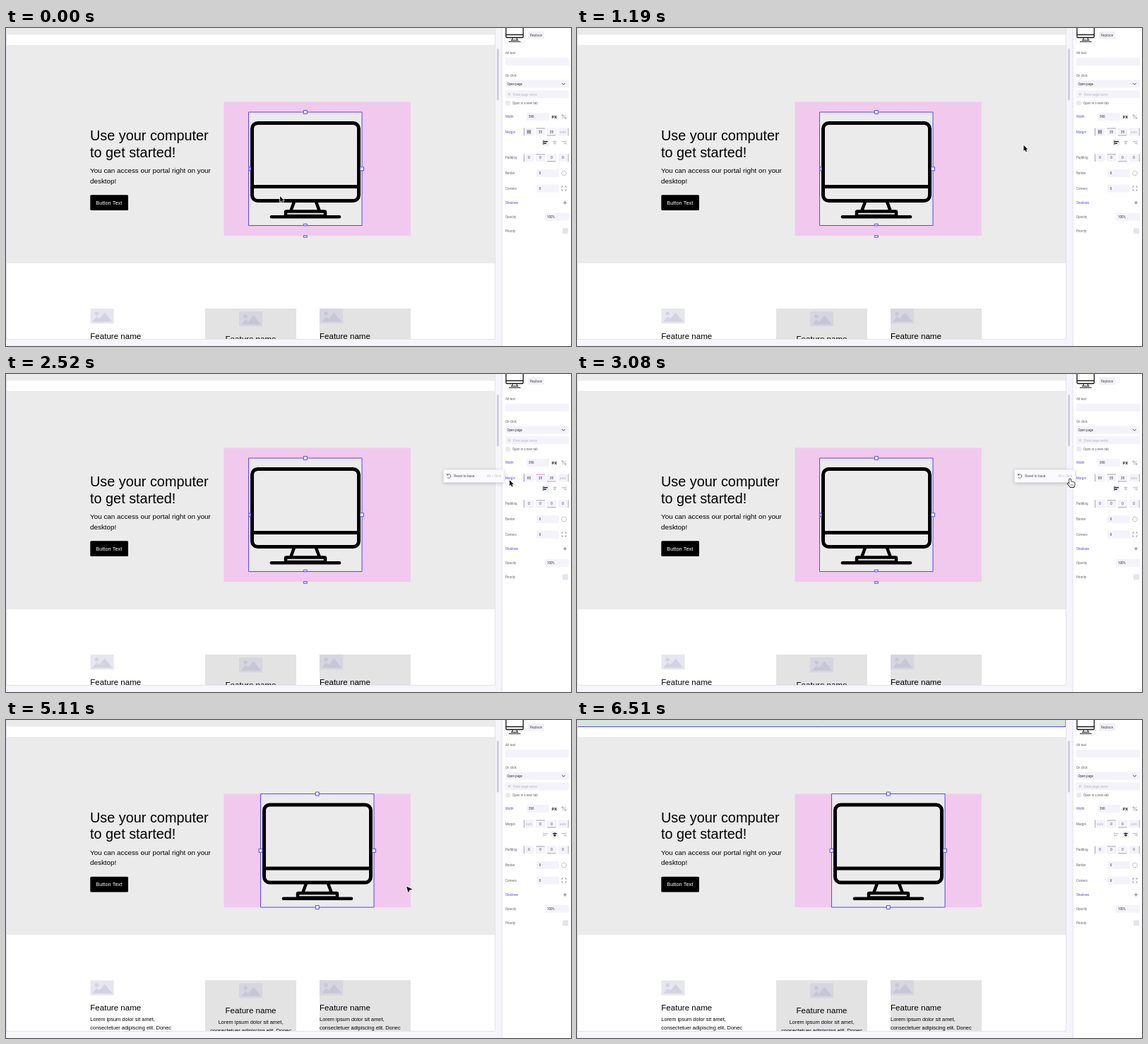
These frames come from a looping animation (800 px wide and 450 px high, 6580 ms). An HTML page with a canvas:

```html
<!DOCTYPE html>
<html lang="en">
<head>
<meta charset="utf-8">
<title>Reset margin to base</title>
<style>
  html, body { margin: 0; width: 100%; height: 100%; overflow: hidden; background: #fff; }
  canvas { display: block; width: 800px; height: 450px; }
</style>
</head>
<body>
<canvas id="stage"></canvas>
<script>
const LOOP = 6580, STEP = 70;
const RESET = 3780, MENU_OPEN = 2450, STRIP_HOVER = 6160;
const BLUE = '#5549ee', LABEL_BLUE = '#5a4fdc', LABEL = '#62626c', INK = '#303038';
const FIELD = '#f4f3fa', FAINT = '#b6b6c2', GREY = '#ebebeb', PINK = '#f2c9ee';
const SANS = '"Liberation Sans", Arial, sans-serif';
const UI = 'Roboto, Inter, sans-serif';

const canvas = document.getElementById('stage');
const ratio = window.devicePixelRatio || 1;
canvas.width = 800 * ratio;
canvas.height = 450 * ratio;
const c = canvas.getContext('2d');

const clamp = v => Math.max(0, Math.min(1, v));
const smooth = v => v * v * (3 - 2 * v);

function box(x, y, w, h, fill, r = 0) {
  c.fillStyle = fill;
  c.beginPath();
  c.roundRect(x, y, w, h, r);
  c.fill();
}

function frame(x, y, w, h, color, width = 1, r = 0) {
  c.strokeStyle = color;
  c.lineWidth = width;
  c.beginPath();
  c.roundRect(x, y, w, h, r);
  c.stroke();
}

function line(points, color, width, cap = 'butt') {
  c.strokeStyle = color;
  c.lineWidth = width;
  c.lineCap = cap;
  c.lineJoin = 'round';
  c.beginPath();
  points.forEach(([x, y]) => c.lineTo(x, y));
  c.stroke();
}

function shape(points, fill, outline, width = 1) {
  c.beginPath();
  points.forEach(([x, y]) => c.lineTo(x, y));
  c.closePath();
  c.lineJoin = 'round';
  if (outline) {
    c.strokeStyle = outline;
    c.lineWidth = width;
    c.stroke();
  }
  c.fillStyle = fill;
  c.fill();
}

function circle(x, y, r, fill, stroke, width = 1) {
  c.beginPath();
  c.arc(x, y, r, 0, Math.PI * 2);
  if (fill) { c.fillStyle = fill; c.fill(); }
  if (stroke) { c.strokeStyle = stroke; c.lineWidth = width; c.stroke(); }
}

function text(str, x, y, size, color = '#000', align = 'left', font = SANS, weight = 400) {
  c.font = `${weight} ${size}px ${font}`;
  c.textAlign = align;
  c.fillStyle = color;
  c.fillText(str, x, y);
}

// Panel text, placed by its vertical centre
function ui(str, x, mid, color = LABEL, align = 'left', size = 4.5, weight = 400) {
  text(str, x, mid + size * 0.36, size, color, align, UI, weight);
}

function handle(x, y, w = 5, h = 5) {
  box(x - w / 2, y - h / 2, w, h, '#f6f5ff');
  frame(x - w / 2, y - h / 2, w, h, BLUE, 1);
}

function computer(x, y) {
  c.save();
  c.translate(x, y);
  frame(5, 15.5, 151, 110, '#000', 5, 8);
  line([[5, 105.5], [156, 105.5]], '#000', 5);
  line([[64.5, 127], [60, 139]], '#000', 4.5);
  line([[95.5, 127], [100, 139]], '#000', 4.5);
  frame(52.5, 140.5, 56, 6.5, '#000', 4.5, 1);
  line([[32.5, 148.2], [128.5, 148.2]], '#000', 4.6, 'round');
  c.restore();
}

function placeholder(x, y, back, front) {
  c.save();
  c.beginPath();
  c.rect(x, y, 33.5, 21.5);
  c.clip();
  box(x, y, 33.5, 21.5, back);
  circle(x + 9, y + 7, 2.6, front);
  shape([[x + 3, y + 18.5], [x + 9, y + 11.5], [x + 13, y + 14.5], [x + 20.5, y + 5.5],
    [x + 31, y + 18.5]], front);
  c.restore();
}

function feature(x, y, card, centered) {
  if (card) box(x, y, 129, 100, '#e3e3e3');
  const top = centered ? y + 4 : y;
  const align = centered ? 'center' : 'left';
  const tx = centered ? x + 64.5 : x;
  placeholder(centered ? x + 48 : x, top, card ? '#d6d6df' : '#e6e6ef', card ? '#c6c6d6' : '#d2d2e0');
  text('Feature name', tx, top + 42.8, 11.56, '#000', align);
  text('Lorem ipsum dolor sit amet,', tx, top + 58, 7.43, '#000', align);
  text('consectetuer adipiscing elit. Donec', tx, top + 69.5, 7.43, '#000', align);
}

function page(reset, stripHover) {
  const up = reset ? -14.4 : 0;
  c.save();
  c.beginPath();
  c.rect(0, 0, 692.5, 440);
  c.clip();

  box(0, 0, 692.5, 9.5, stripHover ? '#d5e4dc' : GREY);
  if (stripHover) frame(0.5, -5, 691.5, 14.5, BLUE, 1);
  box(0, 24, 692.5, 309 + 2 * up, GREY);

  text('Use your computer', 119, 159 + up, 19.85);
  text('to get started!', 119, 182.8 + up, 19.85);
  text('You can access our portal right on your', 119, 205.2 + up, 9.9);
  text('desktop!', 119, 219.8 + up, 9.9);
  box(119.3, 236.2 + up, 53.7, 21.8, '#000', 1.5);
  text('Button Text', 127.2, 249.8 + up, 7.43, '#fff');

  box(308.5, 104.5, 264.5, reset ? 160.5 : 189.5, PINK);
  const x = reset ? 360.5 : 343.5, y = reset ? 104.5 : 119;
  box(x, y, 160.5, 160.5, GREY);
  computer(x, y);
  frame(x, y, 160.5, 160.5, BLUE, 1);
  handle(x + 80.3, y);
  handle(x + 160.5, y + 80.3);
  if (reset) {
    handle(x, y + 80.3);
    handle(x + 80.3, y + 160.5);
  } else {
    handle(x + 1.5, y + 80.3, 2.5, 5);
    handle(x + 80.3, y + 159.5, 5, 2.5);
    handle(x + 80.3, 295, 5, 2.5);
  }

  const fy = 397 + 2 * up;
  feature(119.3, fy, false, false);
  feature(282, fy, true, true);
  feature(444, fy, true, false);
  c.restore();

  line([[0.5, 0], [0.5, 440]], '#dfdfec', 1);
  box(692.5, 0, 9, 450, '#f6f5fb');
  box(0, 440, 701.5, 10, '#f5f5fb');
  line([[0, 440.5], [692.5, 440.5]], '#e2e2ec', 1);
  line([[692.5, 0], [692.5, 440]], '#e2e2ec', 1);
  box(695, 29, 3, 73.5, '#d0cfda', 1.5);
  line([[702, 0], [702, 450]], '#dcdce8', 1);
}

function quad(y, values, bars) {
  values.forEach((v, i) => {
    const x = 740.5 + 16 * i;
    box(x - 6.5, y - 5.5, 13.5, 11, FIELD, 1);
    ui(v, x, y, v === 'auto' ? FAINT : INK, 'center');
  });
  line([[733.5, y - 5.5], [733.5, y + 5.5]], bars[0], 1);
  line([[750.5, y - 5], [763, y - 5]], bars[1], 1);
  line([[766, y + 5], [778.5, y + 5]], bars[2], 1);
  line([[796.2, y - 5.5], [796.2, y + 5.5]], bars[3], 1);
}

function alignIcon(x, y, dir, active) {
  const color = active ? '#25252c' : '#c6c6d0';
  if (active) box(x - 5, y - 5, 10, 10, '#f0f0f6', 1);
  line([[x + 3 * dir, y - 3], [x + 3 * dir, y + 3]], color, 1);
  const row = (w, dy) => {
    const left = x - w / 2 - dir * (w / 2 - 2.5);
    const start = dir === 0 ? x - w / 2 : dir < 0 ? x - 2.5 : left - w / 2 + 2.5;
    line([[start, y + dy], [start + w, y + dy]], color, 1.4);
  };
  row(5.5, -1.3);
  row(3.5, 1.3);
}

function panel(reset, marginHover, selected) {
  c.save();
  c.translate(707.5, -11.5);
  c.scale(0.158, 0.2);
  frame(3, 0, 154, 125, '#111', 8, 8);
  line([[3, 105], [157, 105]], '#111', 7);
  c.restore();
  line([[717.5, 14], [716.5, 17]], '#111', 1);
  line([[723, 14], [724, 17]], '#111', 1);
  line([[715, 17.2], [725.5, 17.2]], '#111', 1);
  line([[712, 19.3], [728.5, 19.3]], '#111', 1);
  frame(706.5, -5, 28, 26.5, '#efeff5', 1, 1.5);
  box(739, 4.8, 23, 10.5, '#f0f0f6', 1.5);
  ui('Replace', 750.5, 10, '#50505a', 'center', 4.9);

  ui('Alt text', 707, 35);
  box(707, 42, 90, 11, FIELD, 1.5);
  ui('On click', 707, 67);
  box(707, 73.5, 90, 11, FIELD, 1.5);
  ui('Open page', 709.5, 79, INK);
  line([[787.3, 78], [789.5, 80.3], [791.7, 78]], '#333', 0.9);
  box(707, 88.3, 90, 11, FIELD, 1.5);
  circle(712.5, 93.8, 1.3, null, FAINT, 0.8);
  ui('Enter page name', 718, 94, FAINT);
  box(707.3, 103, 6.5, 6.5, '#e9e9f0', 1);
  ui('Open in a new tab', 717, 106.2);

  ui('Width', 707, 125.5, LABEL_BLUE);
  box(737, 120, 32, 11, FIELD, 1.5);
  ui('390', 740, 125.5, INK);
  ui('PX', 776.5, 125.7, '#222', 'center', 5.8, 700);
  line([[787.5, 128.3], [792.5, 122.7]], '#888892', 0.7);
  circle(788, 123.8, 1.1, null, '#888892', 0.7);
  circle(792, 127.4, 1.1, null, '#888892', 0.7);

  const bar = '#a8a8b5', hot = '#e08add';
  ui('Margin', 707, 147, reset ? LABEL : LABEL_BLUE);
  quad(147, reset ? ['auto', '0', '0', 'auto'] : ['85', '35', '35', 'auto'],
    marginHover ? ['#8e86e8', hot, hot, bar] : [bar, bar, bar, bar]);
  if (selected) {
    box(737.3, 143.5, 6.2, 7, marginHover ? '#a9cdf7' : '#cfcfd6');
    ui('85', 740.5, 147, INK, 'center');
  }
  alignIcon(764, 162, -1, !reset);
  alignIcon(777, 162, 0, reset);
  alignIcon(790, 162, 1, false);

  ui('Padding', 707, 183.5);
  quad(183.8, ['0', '0', '0', '0'], [bar, bar, bar, bar]);

  ui('Border', 707, 205.5);
  box(751, 200, 32, 11, FIELD, 1.5);
  ui('0', 756, 205.5, INK, 'center');
  c.setLineDash([2, 0.9]);
  circle(790, 205.5, 3.3, null, '#888892', 0.8);
  c.setLineDash([]);

  ui('Corners', 707, 227);
  box(751, 221.5, 32, 11, FIELD, 1.5);
  ui('0', 756, 227, INK, 'center');
  for (const sx of [-1, 1]) for (const sy of [-1, 1]) {
    line([[790 + sx * 3, 227 + sy], [790 + sx * 3, 227 + sy * 3], [790 + sx, 227 + sy * 3]], '#888892', 0.8);
  }

  ui('Shadows', 707, 247, LABEL_BLUE);
  line([[789, 247.2], [794, 247.2]], '#777781', 0.9);
  line([[791.5, 244.7], [791.5, 249.7]], '#777781', 0.9);

  ui('Opacity', 707, 267);
  box(763, 261.7, 34, 11, FIELD, 1.5);
  ui('100%', 766, 267.2, INK);
  ui('Priority', 707, 287);
  box(788, 283.2, 8, 8, '#e4e4ec', 1.5);
}

function menu(alpha) {
  if (alpha <= 0) return;
  c.save();
  c.globalAlpha = alpha;
  c.shadowColor = 'rgba(40, 40, 80, .28)';
  c.shadowBlur = 5 * ratio;
  c.shadowOffsetY = 1 * ratio;
  box(619.5, 135.5, 85.5, 18, '#fbfbfd', 1.5);
  c.shadowColor = 'transparent';
  c.beginPath();
  c.arc(627, 144.5, 2.8, -2.5, 2.6);
  c.strokeStyle = '#55555f';
  c.lineWidth = 0.8;
  c.stroke();
  line([[624.3, 140.8], [624.5, 143.2], [626.7, 143]], '#55555f', 0.8);
  ui('Reset to base', 634.3, 144.3, '#4c4c56', 'left', 4.8);
  ui('Alt + Click', 701, 144.3, '#bcbcc6', 'right', 4.5);
  c.restore();
}

function ripple(t) {
  if (t < 0 || t > 350) return;
  c.save();
  c.globalAlpha = 1 - clamp((t - 180) / 170);
  circle(668, 148.5, 9 + 6 * clamp(t / 140), 'rgba(255,255,255,.35)', '#5d92de', 1.8);
  c.restore();
}

// time, x, y of the pointer tip
const PATH = [
  [0, 388, 238], [630, 469, 198], [1540, 713, 150], [2520, 713, 150], [3080, 698, 148.5],
  [3500, 668, 149], [4060, 668, 149], [5110, 567, 235.5], [5600, 552, 180], [6250, 530, -14]
];

function pointer(t) {
  const i = PATH.findIndex(p => p[0] > t);
  if (i < 0) return null;
  const [t0, x0, y0] = PATH[i - 1], [t1, x1, y1] = PATH[i];
  const k = smooth((t - t0) / (t1 - t0));
  return [x0 + (x1 - x0) * k, y0 + (y1 - y0) * k];
}

function hand() {
  const points = [[-0.8, 0.6], [0.2, 0], [1.2, 0.6], [1.4, 4], [3.4, 4], [5.4, 4.8], [6.6, 5.6],
    [6.6, 8.4], [5.4, 11.6], [0.6, 11.6], [-1.6, 8.6], [-3.4, 6.6], [-2.6, 5.8], [-0.8, 7]];
  shape(points, '#fff', '#222', 1.7);
  for (const x of [1.3, 3.1, 4.7]) line([[x, 7.6], [x, 10]], '#333', 0.5);
}

function cursor(t) {
  const at = pointer(t);
  if (!at) return;
  c.save();
  c.translate(...at);
  if (t >= 2800 && t < 4200) {
    hand();
  } else if (t >= 4900) {
    shape([[0, 0], [8.6, 4], [4.6, 5.2], [2.6, 9]], '#111', '#fff', 1.4);
  } else {
    shape([[0, 0], [0, 8.2], [1.8, 6.6], [3.1, 9.4], [4.6, 8.7], [3.3, 6], [5.8, 5.9]], '#111', '#fff', 1.4);
  }
  c.restore();
}

function draw(now) {
  const t = Math.floor((now % LOOP) / STEP) * STEP;
  const reset = t >= RESET;
  c.setTransform(ratio, 0, 0, ratio, 0, 0);
  box(0, 0, 800, 450, '#fff');
  page(reset, t >= STRIP_HOVER);
  panel(reset, t >= 1470 && t < 2800, t < MENU_OPEN);
  if (t >= MENU_OPEN) menu(1 - clamp((t - RESET + 70) / 260));
  ripple(t - RESET);
  cursor(t);
  requestAnimationFrame(draw);
}
requestAnimationFrame(draw);
</script>
</body>
</html>
```
